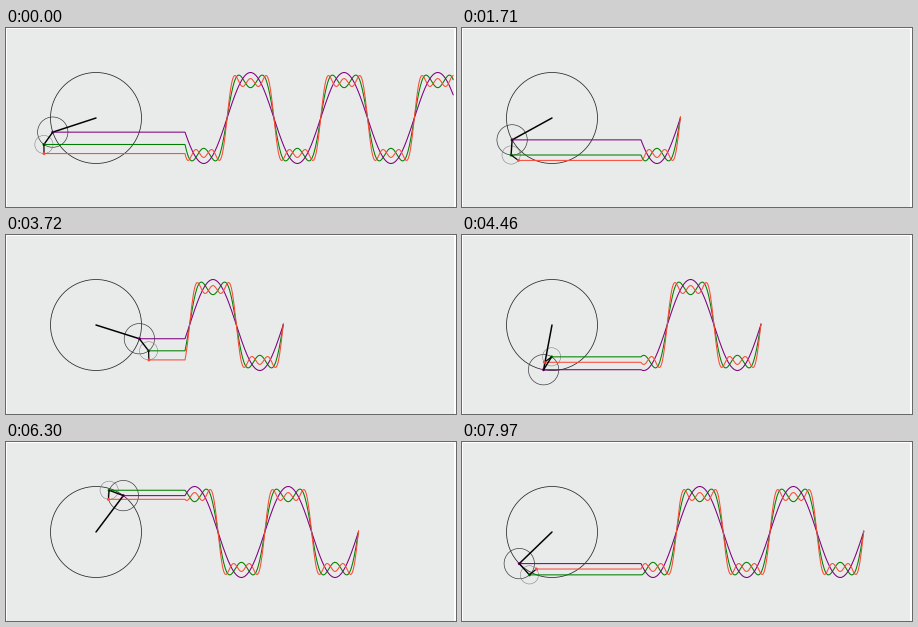
Animation, 450 px wide and 179 px high, one loop 8 s. Source, as a matplotlib script:

```python
import math

import matplotlib.pyplot as plt
import numpy as np
from matplotlib.animation import FuncAnimation
from matplotlib.patches import Circle, Rectangle

W, H, DPI = 450, 179, 64
LOOP, INTERVAL = 8000, 20
CENTER, RADIUS = 90.0, 45.5
WAVE_X, STEP_X, STEP_ANGLE = 179.0, 0.745, 0.05
MAX_POINTS = 360
HARMONICS = (1, 3, 5)
COLORS = ("purple", "green", "#fb4a38")

# Blank moment between the frozen old run and the new one
BLANK_START, BLANK_END = 340, 360


def px(width):
    return width * 72 / DPI


fig = plt.figure(figsize=(W / DPI, H / DPI), dpi=DPI, facecolor="white")
ax = fig.add_axes([0, 0, 1, 1])
ax.set_xlim(0, W)
ax.set_ylim(H, 0)
ax.axis("off")


def add_line(color, width, z):
    line, = ax.plot([], [], color=color, lw=px(width), zorder=z,
                    solid_joinstyle="round", solid_capstyle="round")
    return line


panel = ax.add_patch(Rectangle((1, 1), 447, 178, fc="#e9ebea", lw=0, zorder=0))
circles, arms, dots, waves = [], [], [], []
styles = zip(HARMONICS, COLORS, (0.75, 0.65, 0.5), ("#222222", "#333333", "#777777"),
             (1.5, 1.4, 1.2), (5, 4, 6))
for i, (n, color, ring_width, ring_color, arm_width, z) in enumerate(styles):
    circles.append(ax.add_patch(Circle((CENTER, CENTER), RADIUS / n, fill=False,
                                       lw=px(ring_width), ec=ring_color, zorder=1)))
    arms.append(add_line("black", arm_width, 7 + 2 * i))
    dots.append(ax.add_patch(Circle((0, 0), 1.5, fc=color, lw=0, zorder=8 + 2 * i)))
    waves.append(add_line(color, 1.05, z))
artists = [panel, *circles, *arms, *dots, *waves]


def step_at(t):
    if t < BLANK_START:
        return 433.5 + min(4, math.floor(t / 27.5 + 0.25))
    return max(0, math.floor((t - 352.5) / 25.47) - 0.2)


def update(frame):
    start = frame * INTERVAL
    visible = not BLANK_START <= start < BLANK_END
    for artist in artists:
        artist.set_visible(visible)

    step = step_at(start + INTERVAL / 2)
    index = np.arange(min(math.ceil(step), MAX_POINTS) + 1)
    angles = (step - index) * STEP_ANGLE
    wave_x = WAVE_X + index * STEP_X
    wave_y = np.full(len(index), CENTER)
    x = y = CENTER
    for n, circle, arm, dot, wave in zip(HARMONICS, circles, arms, dots, waves):
        r = RADIUS / n
        circle.center = (x, y)
        tip_x = x + r * math.cos(n * step * STEP_ANGLE)
        tip_y = y + r * math.sin(n * step * STEP_ANGLE)
        arm.set_data([x, tip_x], [y, tip_y])
        dot.center = (tip_x, tip_y)
        x, y = tip_x, tip_y
        wave_y = wave_y + r * np.sin(n * angles)
        wave.set_data(np.r_[x, wave_x], np.r_[y, wave_y])
    return artists


anim = FuncAnimation(fig, update, frames=LOOP // INTERVAL, interval=INTERVAL,
                     repeat=True, repeat_delay=0, blit=False)
plt.show()
```
